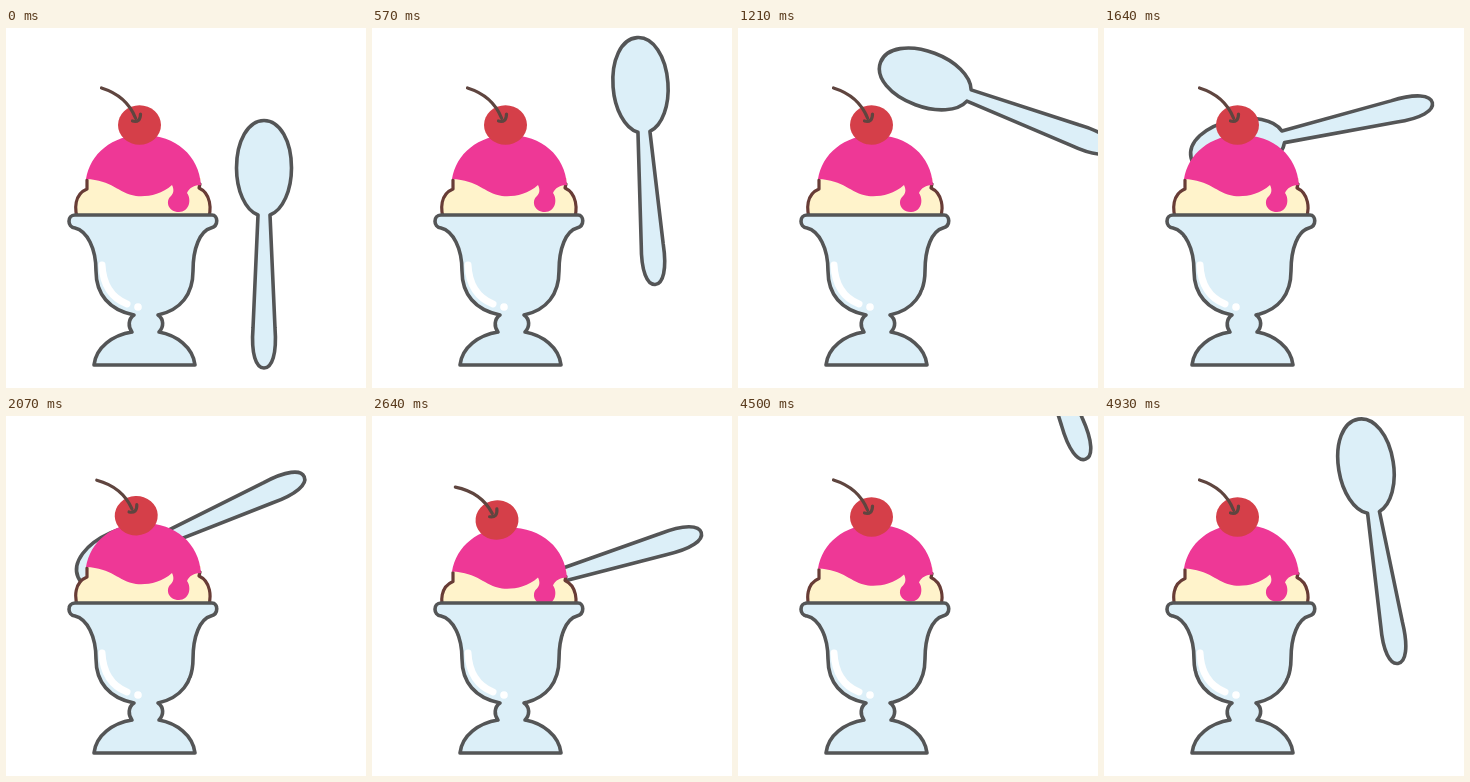
Write an HTML page that moves like this. It is 360x360 px and loops after 5000 ms.

```html
<!DOCTYPE html>
<html lang="en">
<head>
<meta charset="utf-8">
<title>Ice cream and spoon</title>
<style>
html, body { margin: 0; width: 100%; height: 100%; overflow: hidden; background: #fff; }
svg { display: block; width: 100%; height: 100%; }
.glass { fill: #dceff8; stroke: #545556; stroke-width: 3.6; stroke-linejoin: round; }
.line { fill: none; stroke: #683c36; stroke-width: 3.2; stroke-linecap: round; stroke-linejoin: round; }
.stem { stroke: #5f453f; }
.pink { fill: #ee3896; }
.cream { fill: #fff3cb; }
.white { fill: #fff; }
.shine { fill: none; stroke: #fff; stroke-width: 7; stroke-linecap: round; }
</style>
</head>
<body>
<svg viewBox="0 0 360 360">
  <g id="spoon">
    <path class="glass" d="M-6 47C-19 42-27.5 22-27.5 0C-27.5-27-16-47.5 0-47.5C16-47.5 27.5-27 27.5 0C27.5 22 19 42 6 47L11 160C13 186 8 200 0 200C-8 200-13 186-11 160Z"/>
    <g id="bite" transform="rotate(101.5)">
      <path class="white" d="M-45 4C-40 21-20 28 5 24L14 14C-8 18-32 16-44-2Z"/>
      <path class="white" d="M-42-3C-40 10-20 16 0 15C20 14 36 0 36-13Z"/>
      <path class="line" d="M-37 7C-20 19 20 18 36-4"/>
      <path class="pink" d="M-42-3C-38-20-20-29 0-30C22-31 36-24 36-13C36-6 31-1 24 0C14-5 0-4-8 2C-14 0-18 2-17 7C-17 13-26 14-28 8C-27 2-34 2-38 2Z"/>
    </g>
  </g>
  <g id="scoop">
    <path class="cream" d="M73 195C67 180 69 166 81 161L80 150H195L193 160C204 165 207 180 201 195Z"/>
    <path class="line" d="M73 195C67 180 69 166 81 161V152M194 156L193 160C204 165 207 180 201 195"/>
    <path class="pink" d="M80 151C84 126 106 107 137 107C170 107 193 128 195 157C188 157 183 160 181 165C186 172 183 184 173 184C162 184 159 173 165 168C168 165 168 161 166 157C155 167 141 169 130 168C112 165 106 152 80 151Z"/>
  </g>
  <g id="cherry">
    <ellipse rx="21.5" ry="19.7" fill="#d53f49"/>
    <path class="line stem" d="M-38-37C-22-32-10-22-4-7M-7-4Q1-2 1-11"/>
  </g>
  <path class="glass" d="M69 187C61 187 61 199 69 200C81 203 90 220 90 243C90 266 103 282 128 287C122 291 122 299 126 304C107 307 90 319 88 337H189C187 319 170 307 153 304C158 299 158 291 152 287C175 282 187 266 187 243C187 220 194 203 205 200C213 198 212 187 206 187Z"/>
  <path class="shine" d="M96 237C97 257 106 270 121 276"/>
  <circle class="white" cx="132" cy="279" r="3.8"/>
</svg>
<script>
const LOOP = 5000, STEPS = 70;
const $ = id => document.getElementById(id);

// Spoon stops: step, x, y, angle
const stops = [
  [0, 258, 140, 0],
  [8, 268.5, 57, -4.2],
  [17, 187, 51, -69.5],
  [29, 115.5, 142, -114],
  [37, 138, 175, -107],
  [45, 226, 38, -101.5],
  [53, 222, -80, -101.5],
  [62, 285, -215, -24],
  [69, 262, 50, -9.2]
];

const ramp = (step, from, to) => Math.min(1, Math.max(0, (step - from) / (to - from)));
const easeOut = u => u * (2 - u);

function place(id, x, y, angle = 0) {
  $(id).setAttribute("transform", `translate(${x} ${y}) rotate(${angle})`);
}

function draw(now) {
  // Motion is held on steps whose times round to 10 ms
  const step = Math.floor((now % LOOP + 5) / LOOP * STEPS) % STEPS;

  const next = Math.max(1, stops.findIndex(stop => stop[0] >= step));
  const a = stops[next - 1], b = stops[next];
  const u = easeOut(ramp(step, a[0], b[0]));
  place("spoon", ...a.map((v, i) => v + (b[i] - v) * u).slice(1));
  $("bite").style.display = step >= 37 && step < 62 ? "" : "none";

  // The ice cream sinks under the spoon, then partly recovers
  const press = ramp(step, 24, 37), rise = 3 * ramp(step, 45, 53);
  const lean = press - ramp(step, 37, 53);
  place("cherry", 133.5 - 8.5 * lean, 97 + 7 * press - rise, -6 * lean);
  place("scoop", 0, 4.5 * ramp(step, 29, 37) - rise);
}

const start = performance.now();
function tick() {
  draw(performance.now() - start);
  requestAnimationFrame(tick);
}
tick();
</script>
</body>
</html>
```
